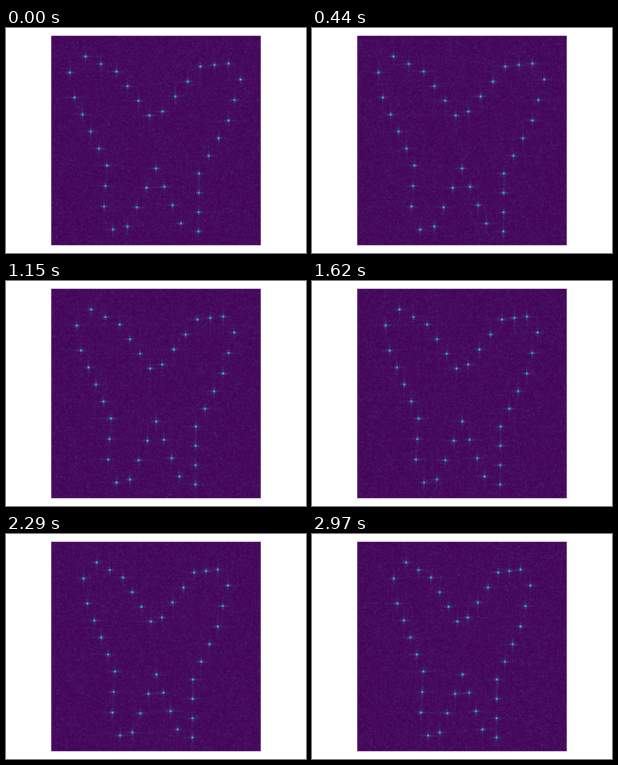
These frames come from a looping animation (300 by 225 pixels, 3 s). A matplotlib script:

```python
import numpy as np
import matplotlib.pyplot as plt
from matplotlib.animation import FuncAnimation
from matplotlib.patches import Rectangle

W, H, DPI = 300, 225, 50
FRAMES, INTERVAL = 100, 30
BAND, N = 128, 256             # spectrum size, zero-padded image size
LEFT, TOP, SIDE = 45.25, 7.75, 209.5
AXIS_X, SHRINK = 152.5, 0.2    # outline narrows towards this vertical line
SPACING = 18.6
NOISE, PEAK = 0.024, 1.1

# Corners of the butterfly
CORNERS = np.array([
    (63.5, 44), (79, 28), (110, 43), (143, 87), (156, 83), (194, 38),
    (222, 35), (234, 51), (222, 92), (192.5, 145), (192, 203), (174.5, 195),
    (149.5, 140), (121, 198), (106.5, 201), (97.5, 178), (100.5, 137),
    (68, 69)])


def scatterers(corners):
    """Spread points evenly along each side of the closed polygon."""
    points = []
    for a, b in zip(corners, np.roll(corners, -1, axis=0)):
        n = round(np.hypot(*(b - a)) / SPACING)
        points += [a + (b - a) * k / n for k in range(n)]
    return np.array(points)


def response(pos, start):
    """Point response along one axis, one row per scatterer."""
    grid = start + (np.arange(N) + 0.5) * SIDE / N
    return np.sinc((grid - pos[:, None] - 0.5) * BAND / SIDE)


def speckle(rng):
    """Complex noise limited to the same band as the signal."""
    spectrum = rng.normal(size=(2, BAND, BAND))
    return np.fft.ifft2(spectrum[0] + 1j * spectrum[1], (N, N)) * N * N / BAND


POINTS = scatterers(CORNERS)
PHASE = np.exp(2j * np.pi * np.random.default_rng(4).random(len(POINTS)))
ROWS = response(POINTS[:, 1], TOP) * PHASE[:, None]


def radar_image(i):
    scale = 1 - SHRINK * i / (FRAMES - 1)
    x = AXIS_X + (POINTS[:, 0] - AXIS_X) * scale
    noise = NOISE * speckle(np.random.default_rng(100 + i))
    return np.abs(ROWS.T @ response(x, LEFT) + noise)


fig = plt.figure(figsize=(W / DPI, H / DPI), dpi=DPI, facecolor="white")
ax = fig.add_axes([0, 0, 1, 1])
ax.axis("off")

# Soft outer edge, with the image on whole pixels inside it
ax.add_patch(Rectangle((LEFT, TOP), SIDE, SIDE, lw=0, snap=False,
                       color=plt.get_cmap("viridis")(0.03)))
inner = fig.add_axes([46 / W, 8 / H, 208 / W, 209 / H])
inner.axis("off")
im = inner.imshow(radar_image(0), cmap="viridis", vmin=0, vmax=PEAK,
                  aspect="auto",
                  extent=(LEFT, LEFT + SIDE, TOP + SIDE, TOP))
inner.set(xlim=(46, 254), ylim=(217, 8))
ax.set(xlim=(0, W), ylim=(H, 0))


def update(i):
    im.set_data(radar_image(i))
    return [im]


anim = FuncAnimation(fig, update, frames=FRAMES, interval=INTERVAL,
                     repeat=True, repeat_delay=0)
plt.show()
```
